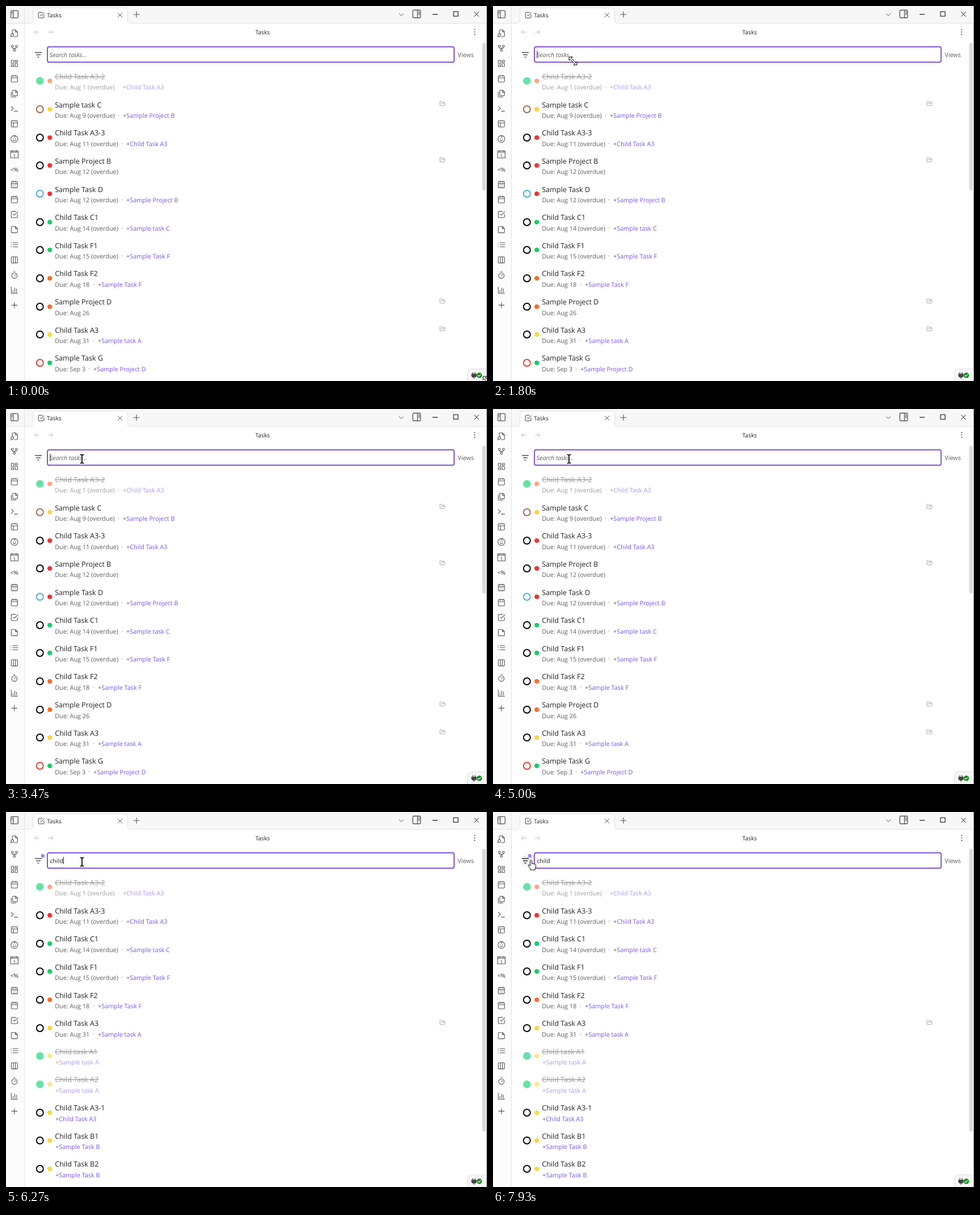
An HTML page for the animation above (8 s loop, 848 px wide and 661 px high).

```html
<!DOCTYPE html>
<html lang="en">
<head>
<meta charset="utf-8">
<title>Tasks</title>
<style>
  html, body { margin: 0; width: 100%; height: 100%; overflow: hidden; background: #fff; }
  svg { display: block; width: 848px; height: 661px; }
  text { font: 10.85px "Open Sans", "Noto Sans", sans-serif; fill: #5c5c5c; text-rendering: geometricPrecision; white-space: pre; }
  .title { font-size: 12.6px; fill: #222; }
  .tab { font-size: 10.3px; fill: #222; }
  .link { fill: #7852ee; }
  .done { opacity: .6; }
  .done .title { fill: #5c5c5c; text-decoration: line-through; }
  .icon { fill: none; stroke: #555; stroke-width: 1.8; stroke-linecap: round; stroke-linejoin: round; }
</style>
</head>
<body>
<svg id="stage" viewBox="0 0 848 661"></svg>
<script>
const DURATION = 8000, FPS = 15;
const stage = document.getElementById('stage');

const icon = (x, y, size, d, style = '') =>
  `<path class="icon" style="${style}" transform="translate(${x - size / 2} ${y - size / 2}) scale(${size / 24})" d="${d}"/>`;
const rect = (x, y, w, h, fill, more = '') =>
  `<rect x="${x}" y="${y}" width="${w}" height="${h}" fill="${fill}" ${more}/>`;
const dot = (x, y, r, fill, more = '') => `<circle cx="${x}" cy="${y}" r="${r}" fill="${fill}" ${more}/>`;
const text = (x, y, content, cls = '', more = '') => `<text x="${x}" y="${y}" class="${cls}" ${more}>${content}</text>`;

// Icon outlines on a 24-unit grid
const box = 'M5 3H19Q21 3 21 5V19Q21 21 19 21H5Q3 21 3 19V5Q3 3 5 3Z';
const calendar = 'M5 4H19Q21 4 21 6V20Q21 22 19 22H5Q3 22 3 20V6Q3 4 5 4ZM8 2V6M16 2V6M3 10H21';
const check = 'M21 11V19Q21 21 19 21H5Q3 21 3 19V5Q3 3 5 3H16M9 11L12 14L22 4';
const cross = 'M5 5L19 19M19 5L5 19';
const plus = 'M4 12H20M12 4V20';
const arrow = 'M20 12H4M11 5L4 12L11 19';
const folder = 'M6 14L7.5 11Q8 10 9 10H20Q22.5 10 22 12.500L20.500 18.500Q20 20 18.500 20H4Q2 20 2 18V5Q2 3 4 3H8L11 6H18Q20 6 20 8V10';

const ribbon = [
  'M6 11V4Q6 2 8 2H15L21 8V20Q21 22 19 22H12M15 2V8H21M2 17a4 4 0 1 0 8 0a4 4 0 1 0-8 0M4 20L1 23',
  'M9 18a3 3 0 1 0 6 0a3 3 0 1 0-6 0M3 6a3 3 0 1 0 6 0a3 3 0 1 0-6 0M15 6a3 3 0 1 0 6 0a3 3 0 1 0-6 0M6 9Q6 12 8 12H16Q18 12 18 9M12 12V15',
  'M3 3H10V12H3ZM14 3H21V8H14ZM14 12H21V21H14ZM3 16H10V21H3Z',
  calendar,
  'M16 2H9Q7 2 7 4V16Q7 18 9 18H19Q21 18 21 16V7ZM15 2V8H21M3 7V20Q3 22 5 22H16',
  'M3 17L9 11L3 5M12 19H21',
  box + 'M3 9H21M9 21V9',
  'M2 12a10 10 0 1 0 20 0a10 10 0 1 0-20 0M8 11H9M15 11H16M8 15Q12 19 16 15M12 2Q15 5 12 7',
  'M1 3H23V23H1ZM6 1V4M18 1V4M1 7H23',
  '',
  calendar + 'M8 14H8.100M12 14H12.100M16 14H16.100M8 18H8.100M12 18H12.100M16 18H16.100',
  calendar,
  check,
  'M5 3H15L21 9V19Q21 21 19 21H5Q3 21 3 19V5Q3 3 5 3ZM15 3V9H21',
  'M8 6H22M8 12H22M8 18H22M2 6H3M2 12H3M2 18H3',
  box + 'M9 3V21M15 3V21',
  'M10 2H14M12 14L15 11M4 14a8 8 0 1 0 16 0a8 8 0 1 0-16 0',
  'M3 3V21H21M8 17V13M13 17V6M18 17V9',
  plus
];

const colors = { red: '#fa2f30', orange: '#ff6a26', yellow: '#ffd53c', green: '#10d068' };

// title, ring colour ('' = completed), priority, due text, project x, project, folder mark
const tasks = [
  ['Child Task A3-2', '', 'orange', 'Aug 1 (overdue)', 206, 'Child Task A3'],
  ['Sample task C', '#a3694d', 'yellow', 'Aug 9 (overdue)', 206, 'Sample Project B', 1],
  ['Child Task A3-3', '#000', 'red', 'Aug 11 (overdue)', 212, 'Child Task A3'],
  ['Sample Project B', '#000', 'red', 'Aug 12 (overdue)', 0, '', 1],
  ['Sample Task D', '#4aaae8', 'red', 'Aug 12 (overdue)', 212, 'Sample Project B'],
  ['Child Task C1', '#000', 'green', 'Aug 14 (overdue)', 212, 'Sample task C'],
  ['Child Task F1', '#000', 'green', 'Aug 15 (overdue)', 212, 'Sample Task F'],
  ['Child Task F2', '#000', 'orange', 'Aug 18', 162, 'Sample Task F'],
  ['Sample Project D', '#000', 'orange', 'Aug 26', 0, '', 1],
  ['Child Task A3', '#000', 'yellow', 'Aug 31', 162, 'Sample task A', 1],
  ['Sample Task G', '#f33a35', 'green', 'Sep 3', 154, 'Sample Project D'],
  ['Child task A1', '', 'yellow', '', 87, 'Sample task A'],
  ['Child Task A2', '', 'yellow', '', 87, 'Sample task A'],
  ['Child Task A3-1', '#000', 'yellow', '', 87, 'Child Task A3'],
  ['Child Task B1', '#000', 'yellow', '', 87, 'Sample Task B'],
  ['Child Task B2', '#000', 'yellow', '', 87, 'Sample Task B']
];

function taskRow([title, ring, priority, due, projectX, project, hasFolder], i) {
  const top = i * 49.65;
  const y = Math.round(132.3 + top), titleY = Math.round(128.9 + top), metaY = y + 15;
  return `<g class="${ring ? '' : 'done'}">` +
    (ring ? dot(59.8, y, 6, 'none', `stroke="${ring}" stroke-width="1.9"`) : dot(59.8, y, 6.8, '#00d26c')) +
    dot(77.2, y, 4.1, colors[priority]) +
    text(86.2, titleY, title, 'title') +
    (due ? text(86.2, metaY, 'Due: ' + due) : '') +
    (due && project ? dot(projectX - 7.5, y + 10.5, 1, '#bbb') : '') +
    (project ? text(projectX, metaY, `+<tspan class="link">${project}</tspan>`) : '') +
    (hasFolder ? icon(769.5, y - 10, 11, folder, 'stroke:#999') : '') + '</g>';
}

const list = (id, rows, thumb) => `<g id="${id}">${rows.slice(0, 11).map(taskRow).join('')}` +
  rect(839.5, 65, 6.5, thumb, '#dadada', 'rx="2"') + '</g>';

const outline = 'fill="#fff" stroke="#000" stroke-width="1"';
const beam = 'M-3.500-7.500H-1.500L0-6.500L1.500-7.500H3.500M0-6.500V6.500M-3.500 7.500H-1.500L0 6.500L1.500 7.500H3.500';
const pointers = {
  resize: `<path ${outline} d="M-7-7h6l-2 2 8 8 2-2v6h-6l2-2-8-8-2 2z"/>`,
  beam: `<path fill="none" stroke="#fff" stroke-width="3.200" d="${beam}"/><path fill="none" stroke="#000" stroke-width="1.700" d="${beam}"/>`,
  arrow: `<path ${outline} d="M0 0V16L3.700 12.500L6 18L8.500 17L6.200 11.500H11.500Z"/>`,
  hand: `<path ${outline} d="M-1.500 1.500a1.500 1.500 0 0 1 3 0V6q1.300-1 2.600.4 1.300-.7 2.400.5 2-.2 2 1.600v4L7 15v2H-1v-2l-4-5.500q.4-2 2-1.200l1.500 1.700z"/>`
};

stage.innerHTML =
  rect(0, 0, 848, 661, '#fff') + rect(0, 31, 32, 630, '#fcfcfc') + rect(0, 0, 848, 31, '#f7f7f7') +
  rect(0, 30, 848, 1, '#e2e2e2') + rect(32, 0, 1, 661, '#e2e2e2') +
  '<path d="M43 30.500Q47.500 30.500 47.500 26V9Q47.500 3.500 53 3.500H209Q214.500 3.500 214.500 9V26Q214.500 30.500 219 30.500" fill="#fff" stroke="#e0e0e0"/>' +
  rect(44, 30, 174, 1, '#fff') +
  icon(15, 14.5, 17, box + 'M9 3V21M5.500 7H6.500M5.500 10H6.500') +
  icon(62, 16, 13, check, 'stroke:#333') + text(72, 20, 'Tasks', 'tab') +
  icon(201, 16, 13, cross) + icon(230, 15, 15, plus) +
  icon(697, 15, 13, 'M5 9L12 16L19 9') +
  icon(724, 14, 18, box + 'M14 3V21M17 7H18.500M17 10H18.500M17 13H18.500') +
  rect(752, 14, 9, 1.2, '#111') + rect(789, 10, 8, 8, 'none', 'stroke="#111" stroke-width="1.1"') +
  icon(829.5, 14.5, 13, cross, 'stroke:#111') +
  icon(54.5, 46, 12, arrow, 'stroke:#b5b5b5') +
  `<g transform="matrix(-1 0 0 1 156.500 0)">${icon(78, 46, 12, arrow, 'stroke:#b5b5b5')}</g>` +
  text(452.3, 50, 'Tasks', 'tab', 'text-anchor="middle"') +
  [41.5, 45.8, 50.1].map(y => dot(826.3, y, 1.1, '#555')).join('') +
  ribbon.map((d, i) => icon(14.8, 48 + i * 26.63, 14.5, d)).join('') +
  text(14.8, 266.5, '1', '', 'text-anchor="middle" style="font-size:8px;font-weight:600"') +
  text(14.8, 291.5, '&lt;%', '', 'text-anchor="middle" style="font-size:10px;font-weight:600"') +
  list('allTasks', tasks, 260) +
  list('childTasks', tasks.filter(([title]) => /child/i.test(title)), 498) +
  rect(51, 77, 22, 18, '#f1f1f1', 'id="hover" rx="3"') +
  '<path id="filter" d="M51 82H63M53 86H61M55.500 90H58.500" stroke-width="1.300"/>' +
  dot(64.8, 77.3, 3.2, '#a283f8', 'id="badge"') +
  rect(73, 72, 717, 27, '#fff', 'rx="3" stroke="#8058d8" stroke-width="2"') +
  text(77, 90, 'Search tasks...', '', 'id="hint" style="font-style:italic;font-size:10.500px"') +
  text(77.3, 90, '', '', 'id="query" style="font-size:10.600px;fill:#222"') +
  rect(0, 79, 1, 13, '#111', 'id="caret"') +
  text(796.3, 90, 'Views') +
  '<path d="M813.500 662V648Q813.500 639.500 822 639.500H849V662Z" fill="#f6f6f6" stroke="#e0e0e0"/>' +
  '<path d="M821 649H829V651Q829 654 826 654H824Q821 654 821 651ZM823 645.500V649M827 645.500V649M825 654V657" fill="#444" stroke="#444" stroke-width="1.300"/>' +
  dot(834.5, 651, 4.7, '#0c8a16') + icon(834.5, 651, 7, 'M4 12L10 18L20 6', 'stroke:#fff;stroke-width:4') +
  rect(847, 0, 1, 661, '#888') +
  '<g id="pointer"></g>';

const el = {};
stage.querySelectorAll('[id]').forEach(node => el[node.id] = node);
const show = (node, on) => node.style.display = on ? '' : 'none';

const blinks = [270, 800, 1330, 1870, 2400, 2930, 3470, 4000, 4530, 5000, 5470, 6530, 7000, 7530];
const typing = [[5470, 'c'], [5600, 'ch'], [5870, 'chi'], [6000, 'child']];
const path = [ // time, x, y
  [0, 848, 660], [600, 848, 660], [930, 844, 655], [1000, 844, 655], [1067, 841, 652],
  [1867, 77, 46], [1933, 69, 44], [2000, 69, 44], [2133, 143, 95], [2200, 143, 95],
  [2600, 140, 88], [2733, 140, 88], [2933, 137, 88], [3067, 137, 88], [3200, 134, 88],
  [7133, 134, 88], [7333, 127, 100], [7467, 143, 98], [7600, 128, 97], [7933, 67, 85], [8000, 67, 85]
];
const pointerKinds = [[0, 'resize'], [2330, 'beam'], [7390, 'arrow'], [7860, 'hand']];

const latest = (keys, t) => keys.filter(([start]) => t >= start).pop();

function pointerAt(t) {
  const next = path.findIndex(([time]) => time > t);
  const [t0, x0, y0] = path[next - 1], [t1, x1, y1] = path[next];
  const p = (t - t0) / (t1 - t0);
  return [x0 + (x1 - x0) * p, y0 + (y1 - y0) * p];
}

let currentKind;
function draw(t) {
  const filtered = t >= 6270;
  show(el.allTasks, !filtered);
  show(el.childTasks, filtered);
  show(el.badge, filtered);

  const query = (latest(typing, t) || [0, ''])[1];
  el.query.textContent = query;
  show(el.hint, !query);
  show(el.caret, blinks.filter(time => t >= time).length % 2);
  el.caret.setAttribute('x', 77.4 + (query ? el.query.getComputedTextLength() : 0));

  // The pointer moves in whole screen refreshes; 5 ms absorbs rounding
  const stepped = Math.floor((t + 5) * FPS / 1000) * 1000 / FPS;
  const [x, y] = pointerAt(Math.min(stepped, DURATION - 1));
  const kind = latest(pointerKinds, t)[1];
  if (kind !== currentKind) el.pointer.innerHTML = pointers[currentKind = kind];
  el.pointer.setAttribute('transform', `translate(${Math.round(x)} ${Math.round(y)})`);
  show(el.hover, kind === 'hand');
  el.filter.setAttribute('stroke', kind === 'hand' ? '#222' : '#4c4c4c');
}

const start = performance.now();
function tick() {
  draw((performance.now() - start) % DURATION);
  requestAnimationFrame(tick);
}
tick();
</script>
</body>
</html>
```
